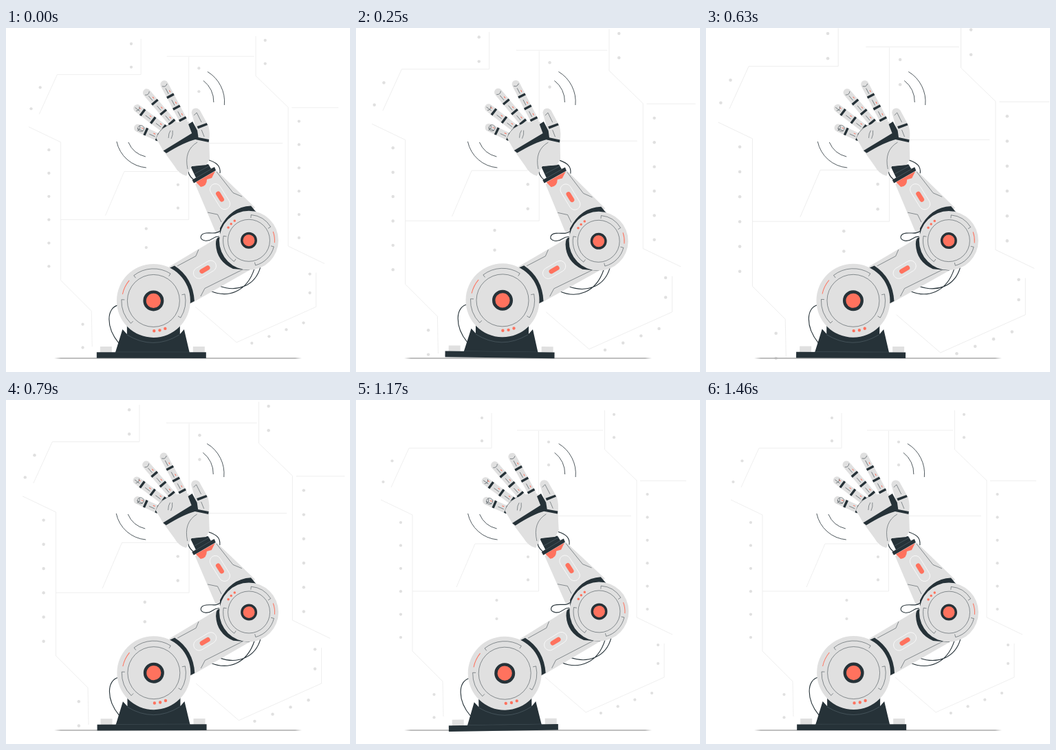
An HTML page that plays this animation: 500x500 px, repeating every 1500 ms.

```html
<!DOCTYPE html>
<html lang="en">
<head>
<meta charset="utf-8">
<title>Waving robot arm</title>
<style>
  html, body { margin: 0; width: 100%; height: 100%; overflow: hidden; background: #fff; }
  svg { display: block; width: 100%; height: 100%; }
  g { transform-box: view-box; }
  #wall { transform-origin: 254px 240px; }
  #robot { transform-origin: 264.5px 278.5px; }
  .wire { fill: none; stroke: #ebebeb; stroke-width: .8; }
  .dot { fill: #e0e0e0; }
  .light { fill: #e0e0e0; }
  .dark { fill: #263238; }
  .red { fill: #ff725e; }
  .line { fill: none; stroke: #263238; stroke-width: .5; }
  .cable { fill: none; stroke: #263238; stroke-width: 1.1; }
  .glow { fill: none; stroke: #ff725e; stroke-width: 1; }
  .slot { fill: none; stroke: #fff; stroke-width: .7; }
  .seam { fill: none; stroke: #607078; stroke-width: .5; }
  .bone { stroke: #e0e0e0; stroke-linecap: round; }
  .ring { stroke: #263238; }
</style>
</head>
<body>
<svg viewBox="0 0 500 500">
  <g id="wall">
    <path class="wire" d="M197 19V70H77L51 127M36 145L82 167V365L126 409L127 460
      M234 44H359M361.5 15V72L408 117V316L460 341M413 117.5H480
      M265.5 45V278H82M266 168.5H400M146 272L173 209H250
      M448 354V403L334 454L275 403"/>
  </g>
  <path d="M70 480L80 479.200H420L430 480L420 480.800H80Z" fill="#a8a8a8"/>
  <path id="waves" class="line" style="stroke-width:.8" d="M161 165A48 48 0 0 0 204 203M178 166A36 36 0 0 0 203 187
    M293 63.500A51 51 0 0 1 317.500 112M287 76.500A38 38 0 0 1 302 108"/>
  <g id="robot">
    <path class="cable" d="M163 403C146 407 145 435 164 458M297 382C322 393 350 384 361 350M310 375C335 384 362 376 370 347
      M265 203Q263 213 273 221M295 192C307 196 312 201 311 211"/>

    <path class="light" d="M137 463h17v9h-17zM272 463h17v9h-17z"/>
    <path class="dark" d="M159 472L169.500 438L176 445V431H253V445L259 438L267 472Z"/>
    <path class="seam" d="M176 446Q214 469 252 446M159 471.300H267"/>
    <path class="dark" d="M132 471.300H291V480H132Z"/>

    <path class="light" d="M237 347L309 304L354 352L268 401Z"/>
    <path class="line" d="M249 346L276 331.500L280 322M283 390L289 378.500L346 350"/>
    <path class="dark" d="M235 350L245 345.500Q272 363 274 397L264 402Z"/>

    <path class="light" d="M275 227L306 207L362 261L312 300L304 295Z"/>
    <path class="line" d="M306 209L330 239.500L343 245M293 268L307.500 271L313 282"/>
    <path class="dark" d="M364 268L356 258.500Q326 260 311 291V304Q305 303 305 314Q306 339 330 350L354 352Z"/>
    <path class="cable" d="M310 303C300 302 300 311 289 309C280 307 282 299 291 298C300 297 305 300 311 295"/>

    <path class="red" d="M276 224L304 208L299 218L292 220Q292 230 283 231Z"/>
    <path class="dark" d="M268 201L294 198L298 204.500L303 202L305 207L273 225.500L270.500 221L276 217.500Z"/>
    <path class="seam" d="M274 212L296 200M276 218L299 204.500"/>

    <g id="hand"></g>
    <path class="light" d="M218 160L225 147L245 137L265 136L277 149L270 160L230 181Z"/>
    <path class="light" d="M229 179L272 158L295 162L296 190L291 199L270 201L262 215Q251 212 245 201Z"/>
    <path class="light" d="M269.500 123Q270 116.500 276 116.500Q281 117 283 122L294 142Q297 153 295 164L280 160Z"/>
    <path class="dark" d="M277.500 143L291.500 138L293 141L279 146.500Z"/>
    <path class="dark" d="M228.500 178.500L270 153L265 140L271 136L278 149L279.500 159L295 162L294.500 166L275 162Q259 166 233 182Z"/>
    <path class="line" d="M264 205Q258 178 278 166M236 160Q236 153 239 149M240 161Q243 155 242 149M220 155Q226 145 240 139
      M273 127L277 123L284 137M284 148L288 158"/>
  </g>
</svg>
<script>
const $ = id => document.getElementById(id);
const add = (id, html) => $(id).insertAdjacentHTML('beforeend', html);
const circle = (cls, x, y, r) => `<circle class="${cls}" cx="${x}" cy="${y}" r="${r}"/>`;

function polar(x, y, r, deg) {
  const a = deg * Math.PI / 180;
  return `${x + r * Math.cos(a)} ${y + r * Math.sin(a)}`;
}

// Clockwise arc from angle a to b; tick > 0 adds inward ends.
function arc(cls, x, y, r, a, b, tick = 0) {
  const ends = [a, b].map(deg => polar(x, y, r - tick, deg));
  return `<path class="${cls}" d="M${ends[0]}L${polar(x, y, r, a)}
    A${r} ${r} 0 0 1 ${polar(x, y, r, b)}L${ends[1]}"/>`;
}

function rivets(x, y, n = 2, dx = 0, dy = 33.4) {
  for (let i = 0; i < n; i++) add('wall', circle('dot', x + i * dx, y + i * dy, 2.1));
}
rivets(183, 26);
rivets(375, 21);
rivets(280, 61);
rivets(250, 228);
rivets(113.5, 428);
rivets(65, 178, 6);
rivets(423.5, 137, 6);
rivets(204.5, 291, 2, 0, 27);
rivets(439, 356, 2, 0, 27);
rivets(52.5, 88.5, 2, -13, 30.5);
rivets(430, 426, 4, -24.7, 9.7);

// Finger i of the fan, drawn outwards from its knuckle.
function finger(i) {
  const x = 258 - 17 * i + 1.8 * i * i;
  const y = 135 + 2 * i + 2.1 * i * i;
  const len = 60 + 3 * i - 3.8 * i * i;
  const bar = (cls, a, b, w) => `<line class="${cls}" x1="${a}" x2="${b}" stroke-width="${w}"/>`;
  let html = bar('bone', 0, len, 11.3);
  for (let d = 3; d < len - 9; d += 19) {
    html += bar('ring', d - 1.7, d + 1.7, 11.3);
    html += `<path class="line" d="M${d + 4} -1h9"/><path class="glow" d="M${d + 5} 2.5h3"/>`;
  }
  html += `<path class="line" d="M${len - 1} -4q-4 4 0 8"/>`;
  return `<g transform="translate(${x} ${y}) rotate(${242 - 12.5 * i})">${html}</g>`;
}
for (let i = 0; i < 4; i++) add('hand', finger(i));
add('hand', circle('line', 196, 146, 4.5));

// Capsule window with a red core.
function slot(x, y, deg, w) {
  const pill = (cls, w, h) =>
    `<rect class="${cls}" x="${-w / 2}" y="${-h / 2}" width="${w}" height="${h}" rx="${h / 2}"/>`;
  add('robot', `<g transform="translate(${x} ${y}) rotate(${deg})">
    ${pill('slot', w, 16)}${pill('red', 16.5, 6.7)}</g>`);
}
slot(289, 351, -31, 36);
slot(311, 245, 58, 41);

// Disc joint: notched track around a hub, plus three lamps.
function joint(x, y, r, inner, hub, core, lampAngle, lampStep, notches) {
  const track = r * .87;
  let html = circle('light', x, y, r) + circle('line', x, y, inner);
  for (const [a, b] of notches) html += arc('line', x, y, track, a, b, 4.5);
  for (let i = -1; i < 2; i++) {
    const [lx, ly] = polar(x, y, r * .82, lampAngle + i * lampStep).split(' ');
    html += circle('red', lx, ly, r * .041);
  }
  add('robot', html + circle('dark', x, y, hub) + circle('red', x, y, core));
}
joint(214.5, 396.5, 53.5, 38, 15, 10.6, 78, 10.8, [[-128, -58], [-12, 32], [135, 182]]);
joint(353, 308.7, 43, 30.5, 12, 8.5, -137, 11, [[-85, -32], [14, 75], [125, 190]]);
add('robot', arc('glow', 214.5, 396.5, 46, -168, -140) + arc('glow', 353, 308.7, 37.5, -20, 5));

const LOOP = 1500;
const beat = t => Math.max(0, Math.min(t / 150, (450 - t) / 300));
const sway = p => Math.asin(Math.sin(2 * Math.PI * p)) * 2 / Math.PI;

// Side-to-side jolts that grow, hold at 4 px, then die away.
function jolt(i) {
  const k = Math.min(i, 10 - i);
  return k ? (-1) ** k * Math.min(4, 2 ** (k - 1)) : 0;
}
function shake(p) {
  const i = Math.floor(p * 10);
  return jolt(i) + (jolt(i + 1) - jolt(i)) * (p * 10 - i);
}

function draw(now) {
  const t = (now + 20) % LOOP;
  const p = t / LOOP;
  $('wall').style.transform = `scale(${1 + .1 * (beat(t) + beat(t - 525))})`;
  $('robot').style.transform = `rotate(${sway(p)}deg)`;
  $('waves').style.transform = `translateX(${shake(p)}px)`;
  requestAnimationFrame(draw);
}
draw(0);
</script>
</body>
</html>
```
